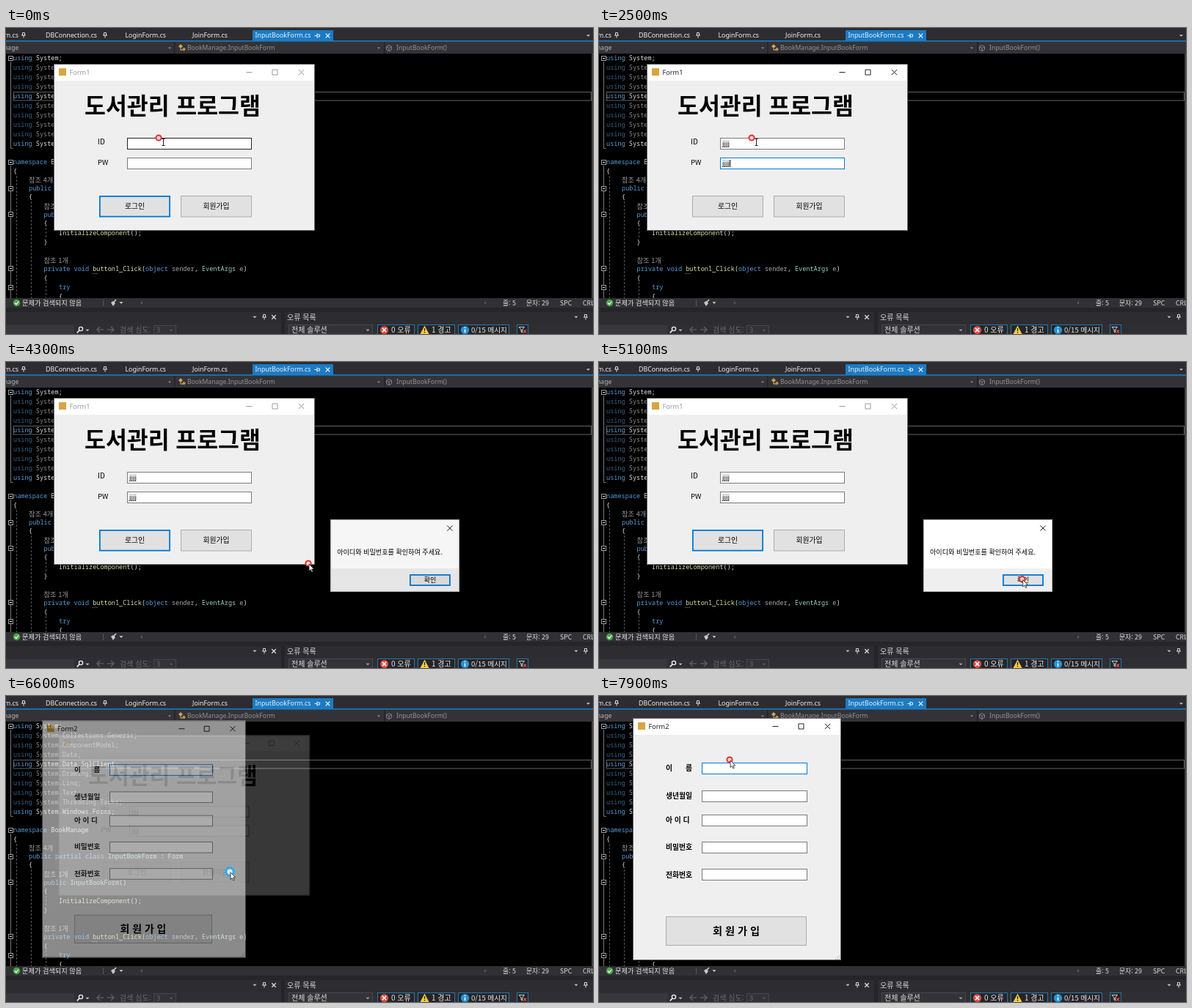
Write an HTML page that moves like this. It is 800 by 418 pixels and loops after 8 s.

```html
<!DOCTYPE html>
<html lang="ko">
<head>
<meta charset="utf-8">
<title>도서관리 프로그램</title>
<style>
html, body { margin: 0; width: 100%; height: 100%; overflow: hidden; background: #000; }
svg { display: block; width: 100vw; height: 100vh; }
text { white-space: pre; font-family: "Noto Sans", "Noto Sans CJK KR", sans-serif; }
.ko { font-family: "Noto Sans CJK KR", sans-serif; }
.code { font-family: "Noto Sans Mono", "Noto Sans CJK KR", monospace; }
.beam { mix-blend-mode: difference; }
</style>
</head>
<body>
<svg id="stage" viewBox="0 0 800 418"><g id="ide"></g><g id="live"></g></svg>
<script>
const LOOP = 8000, STEP = 100;
const BLUE = '#0078d7', GREY = '#7a7a7a', FACE = '#f0eff0', INK = '#000', EDGE = '#68686c';

// Drawing helpers: each returns SVG markup
const rect = (x, y, w, h, fill) => `<rect x="${x}" y="${y}" width="${w}" height="${h}" fill="${fill}"/>`;
const box = (x, y, w, h, fill, stroke, sw = 1) =>
  `<rect x="${x + sw / 2}" y="${y + sw / 2}" width="${w - sw}" height="${h - sw}" fill="${fill}" stroke="${stroke}" stroke-width="${sw}"/>`;
const path = (d, stroke, sw = 1, extra = '') =>
  `<path d="${d}" fill="none" stroke="${stroke}" stroke-width="${sw}" ${extra}/>`;
const shape = (d, fill) => `<path d="${d}" fill="${fill}"/>`;
const disc = (x, y, r, fill) => `<circle cx="${x}" cy="${y}" r="${r}" fill="${fill}"/>`;
const text = (x, yc, str, size, fill, cls = '', extra = '') =>
  `<text x="${x}" y="${(yc + size * 0.36).toFixed(2)}" font-size="${size}" fill="${fill}" class="${cls}" ${extra}>${str}</text>`;
const ko = (x, yc, str, size, fill, extra) => text(x, yc, str, size, fill, 'ko', extra);
const MID = 'text-anchor="middle"';
const cross = (x, y, r, c, sw = 1) =>
  path(`M${x - r} ${y - r}L${x + r} ${y + r}M${x + r} ${y - r}L${x - r} ${y + r}`, c, sw);
const drop = (x, y, c = '#c8c8c8', r = 2.5) => shape(`M${x - r} ${y - r / 2}h${2 * r}l${-r} ${r}z`, c);
const pin = (x, y, c) => path(`M${x - 1.5} ${y}v-3.5h3v3.5M${x - 3} ${y}h6M${x} ${y}v3.5`, c);
const sidePin = (x, y, c) => path(`M${x} ${y - 1.5}h3.5v3h-3.5M${x} ${y - 3}v6M${x} ${y}h-3.5`, c);

// Editor source: x, centre y, line, dimmed
const usings = ['', '.Collections.Generic', '.ComponentModel', '.Data', '.Data.SqlClient',
  '.Drawing', '.Linq', '.Text', '.Threading.Tasks', '.Windows.Forms'];
const lit = [0, 4, 9];
const lines = [
  ...usings.map((u, i) => [10, 41 + i * 12.95, `using System${u};`, !lit.includes(i)]),
  [10, 183, 'namespace BookManage'], [10, 196, '{'],
  [31, 219, 'public partial class InputBookForm : Form'], [31, 231, '{'],
  [51.5, 254.5, 'public InputBookForm()'], [51.5, 267, '{'],
  [72, 280, 'InitializeComponent();'], [51.5, 292.5, '}'],
  [51.5, 328.5, 'private void button1_Click(object sender, EventArgs e)'], [51.5, 341.5, '{'],
  [72, 354, 'try'], [72, 367, '{']
];
const lenses = [[31, 208, '참조 4개'], [51.5, 244, '참조 1개'], [51.5, 317.5, '참조 1개']];
const syntax = [
  [/^(using|namespace|public|partial|class|private|void|object|try)$/, '#569cd6'],
  [/^(InputBookForm|Form|EventArgs)$/, '#9fd0b8'],
  [/^(InitializeComponent|button1_Click)$/, '#dcdcaa'],
  [/^(sender|e)$/, '#a8a8a8']
];
const paint = s => s.replace(/\w+/g, w => {
  const hit = syntax.find(([re]) => re.test(w));
  return hit ? `<tspan fill="${hit[1]}">${w}</tspan>` : w;
});

function ide() {
  let s = rect(0, 0, 800, 418, '#2d2d31') + rect(0, 35, 798, 334, '#000');

  // Tabs
  s += rect(336, 3, 110, 15, '#1c7bc4') + rect(0, 17, 800, 1.6, '#1c7bc4');
  [[-2, 'm.cs'], [54, 'DBConnection.cs'], [162.5, 'LoginForm.cs'], [254, 'JoinForm.cs'], [339.5, 'InputBookForm.cs']]
    .forEach(([x, n]) => s += text(x, 10.3, n, 8.8, '#f1f1f1'));
  s += pin(24, 10, '#ddd') + pin(135, 10, '#ddd') + sidePin(424, 10.5, '#e8f2fa') + cross(438.5, 10.5, 2.8, '#fff', 1.1);
  s += drop(793.5, 10.5);

  // Navigation bar
  s += rect(0, 19, 800, 16, '#333337');
  s += text(-3, 27, 'nage', 8.6, '#b8b8b8') + text(247, 27, 'BookManage.InputBookForm', 8.6, '#949494');
  s += text(532, 27, 'InputBookForm()', 8.6, '#949494');
  [223, 508].forEach(x => s += drop(x, 27.5, '#999', 2));
  [229, 515].forEach(x => s += rect(x, 19, 1.5, 16, '#232326'));
  s += shape('M235 25l3-3 3 3-3 3z', '#d8a050') + shape('M240 29l2.5-2.5 2.5 2.5-2.5 2.5z', '#c9914a') + path('M238 28v2h3', '#bbb');
  s += path('M522 23.5l3.5 2v4l-3.5 2-3.5-2v-4zM518.5 25.5l3.5 2 3.5-2M522 27.5v4', '#8a7a94');

  // Outlining and guides
  s += path('M6.5 46V164.5h3M6.5 188V369', '#777');
  s += path('M14.5 202V369M34.5 237V369M54.5 273V287M54.5 347V369', '#555', 1, 'stroke-dasharray="3 2"');
  [41, 183, 219, 254, 328, 354].forEach(y =>
    s += box(3, y - 3, 7, 7, '#000', '#999') + path(`M5 ${y + .5}h3`, '#ddd'));
  s += box(10, 87, 788, 12.5, 'none', '#626262');

  lines.forEach(([x, y, str, dim]) => s += text(x, y, paint(str), 8.55, '#dcdcdc', 'code', dim ? 'opacity=".62"' : ''));
  lenses.forEach(([x, y, str]) => s += ko(x, y, str, 9.3, '#999'));
  s += path('M118 335.5h7', '#aaa', 1, 'stroke-dasharray="1 1.6"');
  s += rect(798, 35, 2, 334, '#3e3e42');

  // Status strip
  s += rect(0, 369, 800, 13, '#313135');
  s += disc(14.5, 375.5, 4.7, '#4aa84a') + path('M12 375.5l2 2 3.2-4', '#fff', 1.2);
  s += ko(22, 375.5, '문제가 검색되지 않음', 9.2, '#e4e4e4');
  s += rect(132, 371, 1, 9, '#555') + path('M150 371l-3.5 4', '#ddd', 1.4) + shape('M143 375l3-2 3 3-3 4z', '#c8c8c8') + drop(157, 375.5, '#ddd');
  s += shape('M186 373v5l-3-2.5z', '#555') + shape('M652 373v5l3-2.5z', '#555');
  [[677, '줄: 5'], [709, '문자: 29'], [755, 'SPC'], [786, 'CRLF']].forEach(([x, n]) => s += ko(x, 376, n, 8.8, '#dcdcdc'));

  // Lower panels
  s += rect(0, 382, 800, 6, '#26262a') + rect(375, 388, 5, 30, '#252529');
  s += rect(0, 404, 375, 14, '#2f2f33') + rect(380, 404, 420, 14, '#2f2f33');
  s += drop(339, 395) + pin(352, 395, '#ddd') + cross(365, 395, 2.7, '#ddd', 1.3);
  s += drop(777, 395) + pin(790, 395, '#ddd') + ko(383, 395, '오류 목록', 10, '#d8d8d8');
  s += rect(0, 406, 93, 12, '#38383c') + `<circle cx="102" cy="411" r="2.6" fill="none" stroke="#eee" stroke-width="1.4"/>`;
  s += path('M100 413l-3.2 3.4', '#eee', 1.8) + drop(111, 413);
  s += path('M133 412h-9m4-4l-4 4 4 4M138 412h9m-4-4l4 4-4 4', '#5a5a5e', 1.7);
  s += ko(155, 412.5, '검색 심도:', 10, '#6a6a6e') + box(201, 406, 31, 14, '#333337', '#45454a') + text(205, 412.5, '3', 9, '#6a6a6e') + drop(225, 413, '#6a6a6e', 2);
  s += box(385, 405, 115, 15, '#333337', '#47474c') + ko(389, 412.5, '전체 솔루션', 10, '#e0e0e0') + drop(493, 413, '#aaa');
  [[506, 51], [561, 51], [616, 70], [696, 16]].forEach(([x, w]) => s += box(x, 405, w, 15, '#252529', '#2676aa'));
  s += disc(515.5, 412.5, 5.6, '#e04a42') + cross(515.5, 412.5, 2.6, '#fff', 1.5);
  s += shape('M570.5 406.5l6 11.5h-12z', '#f6c945') + path('M570.5 410v4M570.5 415v1.4', '#222', 1.3);
  s += disc(625.5, 412.5, 5.6, '#2793d6') + path('M625.5 411.5v4.5M625.5 408.6v1.5', '#fff', 1.5);
  s += ko(525, 412.5, '0 오류', 10, '#e8e8e8') + ko(580, 412.5, '1 경고', 10, '#e8e8e8') + ko(634, 412.5, '0/15 메시지', 9.6, '#e8e8e8');
  s += path('M699 408.5h7.5l-3 3.5v4l-1.5-1v-3z', '#ccc') + cross(707, 414.5, 2, '#e25045', 1.4);
  return s;
}

// Windows
function frame(x, y, w, h, title, active) {
  const c = active ? '#222' : '#999', r = x + w, m = y + 11.5;
  return rect(x, y, w, h, FACE) + rect(x, y, w, 23, '#fff') + box(x, y, w, h, 'none', EDGE) +
    rect(x + 7, y + 6, 10, 10, '#d9a441') + text(x + 21.5, m, title, 9.2, c) +
    path(`M${r - 93.5} ${m}h8`, c) + path(`M${r - 58} ${m - 3.5}h7v7h-7z`, c) + cross(r - 18.5, m, 3.6, c);
}
const field = (x, y, w, stroke, val = '', caret = false) =>
  box(x, y, w, 16, '#fff', stroke) + text(x + 3, y + 7, val, 9.8, INK) +
  (caret ? rect(x + 3 + val.length * 2.53, y + 3, 1, 10, INK) : '');
const button = (x, y, w, h, label, look, size = 9.8, weight = 500) => {
  const [fill, stroke, sw] = { plain: ['#e1e1e1', '#adadad', 1], main: ['#e1e1e1', BLUE, 1.8], hover: ['#e5f1fb', BLUE, 1.3] }[look];
  return box(x, y, w, h, fill, stroke, sw) + ko(x + w / 2, y + h / 2 - .5, label, size, INK, `${MID} font-weight="${weight}"`);
};
const blink = (t, from) => (((t - from) % 1060) + 1060) % 1060 < 530;
const typed = (t, from) => 'jjjj'.slice(0, Math.max(0, (t - from) / STEP + 1));

function loginForm(t) {
  const inId = t >= 500 && t < 2000, inPw = t >= 2000 && t < 4000;
  const login = t < 500 || t >= 4000 && t < 6500 ? 'main' : t >= 3300 && t < 4000 ? 'hover' : 'plain';
  const active = t >= 500 && t < 4000 || t >= 5900 && t < 6500;
  return frame(65, 49, 356, 228, 'Form1', active) +
    ko(107, 106.5, '도서관리 프로그램', 31.4, INK, 'font-weight="700"') +
    ko(125, 155.5, 'ID', 10, INK) + ko(125, 183.3, 'PW', 9.6, INK) +
    field(165, 150, 170, inId ? BLUE : t < 500 ? '#222' : GREY, typed(t, 1500), inId && blink(t, 500)) +
    field(165, 177, 170, inPw ? BLUE : GREY, typed(t, 2200), inPw && blink(t, 3160)) +
    button(127, 229, 97, 29.5, '로그인', login) +
    button(238, 229, 97, 29.5, '회원가입', t >= 6300 && t < 6500 ? 'hover' : 'plain');
}

function notice() {
  return rect(442, 215, 176, 99, '#fff') + rect(442, 282, 176, 32, FACE) + box(442, 215, 176, 99, 'none', '#b8b8b8') +
    cross(605, 227, 3.6, '#222') + ko(451, 260, '아이디와 비밀번호를 확인하여 주세요.', 9.1, INK) +
    button(550, 290, 56, 16, '확인', 'main', 9, 400);
}

function joinForm(t) {
  const bold = 'font-weight="700"';
  let s = frame(46, 30, 284, 331, 'Form2', true);
  s += ko(91, 98, '이', 9.8, INK, bold) + ko(118, 98, '름', 9.8, INK, bold);
  [['생년월일', 136], ['아 이 디', 169], ['비밀번호', 206], ['전화번호', 244]].forEach(([n, y]) => s += ko(91, y, n, 9.8, INK, bold));
  [91, 129, 162, 199, 236].forEach((y, i) => s += field(140, y, 144, i ? GREY : BLUE, '', !i && t >= 7100 && blink(t, 7100)));
  s += button(91, 301, 192, 40, '회 원 가 입', 'plain', 14.2, 700);
  return s + path('M322 359.5h6M324.5 357h3.5M327 354.5h1', '#aaa', 1.2, 'stroke-dasharray="1.2 1.3"');
}

// Opening and closing share a fade with a slight zoom
const easeOut = (t, from) => 1 - (1 - Math.min(1, Math.max(0, (t - from) / 300))) ** 3;
function show(k, cx, cy, body) {
  if (k <= 0) return '';
  const z = (0.95 + 0.05 * k).toFixed(4);
  return `<g opacity="${k.toFixed(3)}" transform="translate(${cx} ${cy}) scale(${z}) translate(${-cx} ${-cy})">${body}</g>`;
}

// Pointer path: time, x, y, smooth arrival
const track = [[0, 208, 150], [2700, 208, 150], [3400, 202, 247, 1], [3800, 202, 247], [4300, 412, 275], [4700, 573, 295],
  [5300, 578, 297, 1], [5800, 578, 297], [6000, 480, 282], [6400, 305, 240], [6600, 305, 240], [7500, 178, 87, 1], [8000, 178, 87]];
function pointer(t) {
  const i = track.findIndex(k => k[0] > t), a = track[i - 1], b = track[i];
  let u = (t - a[0]) / (b[0] - a[0]);
  if (b[3]) u = u * u * (3 - 2 * u);
  const x = a[1] + (b[1] - a[1]) * u, y = a[2] + (b[2] - a[2]) * u;
  const busy = t >= 5800 && t < 6700, beam = t < 2900 || t >= 6000 && t < 6200;
  const ring = busy
    ? `<circle cx="${x}" cy="${y}" r="5.6" fill="#d4e8f0" stroke="#3d9fd6" stroke-width="3.6"/>` +
      `<circle cx="${x}" cy="${y}" r="6.6" fill="none" stroke="#7cc4e6" stroke-width="1.8" stroke-dasharray="1.2 2.25"/>`
    : `<circle cx="${x}" cy="${y}" r="3.6" fill="#fbd8d8" stroke="#e5322e" stroke-width="2"/>`;
  const hand = beam
    ? path(`M${x + 4.5} ${y + 1.5}h4M${x + 6.5} ${y + 1.5}v9M${x + 4.5} ${y + 10.5}h4`, '#ddd', 1, 'class="beam"')
    : `<path d="M${x + 1} ${y + 1}v9.6l2.2-2.1 1.6 3.5 1.5-.7-1.6-3.4h3z" fill="#fff" stroke="#222" stroke-width=".8"/>`;
  return ring + hand;
}

function draw(t) {
  const open = easeOut(t, 4100), shut = easeOut(t, 5885);
  return show(1 - easeOut(t, 6485), 243, 163, loginForm(t)) +
    show(open * (1 - shut), 530, 264.5, notice()) +
    show(easeOut(t, 6525), 188, 195.5, joinForm(t)) + pointer(t);
}

document.getElementById('ide').innerHTML = ide();
const live = document.getElementById('live');
const start = performance.now();
let last = -1;
function tick() {
  const t = Math.floor(((performance.now() - start) % LOOP) / STEP) * STEP;
  if (t !== last) live.innerHTML = draw(last = t);
  requestAnimationFrame(tick);
}
tick();
</script>
</body>
</html>
```
